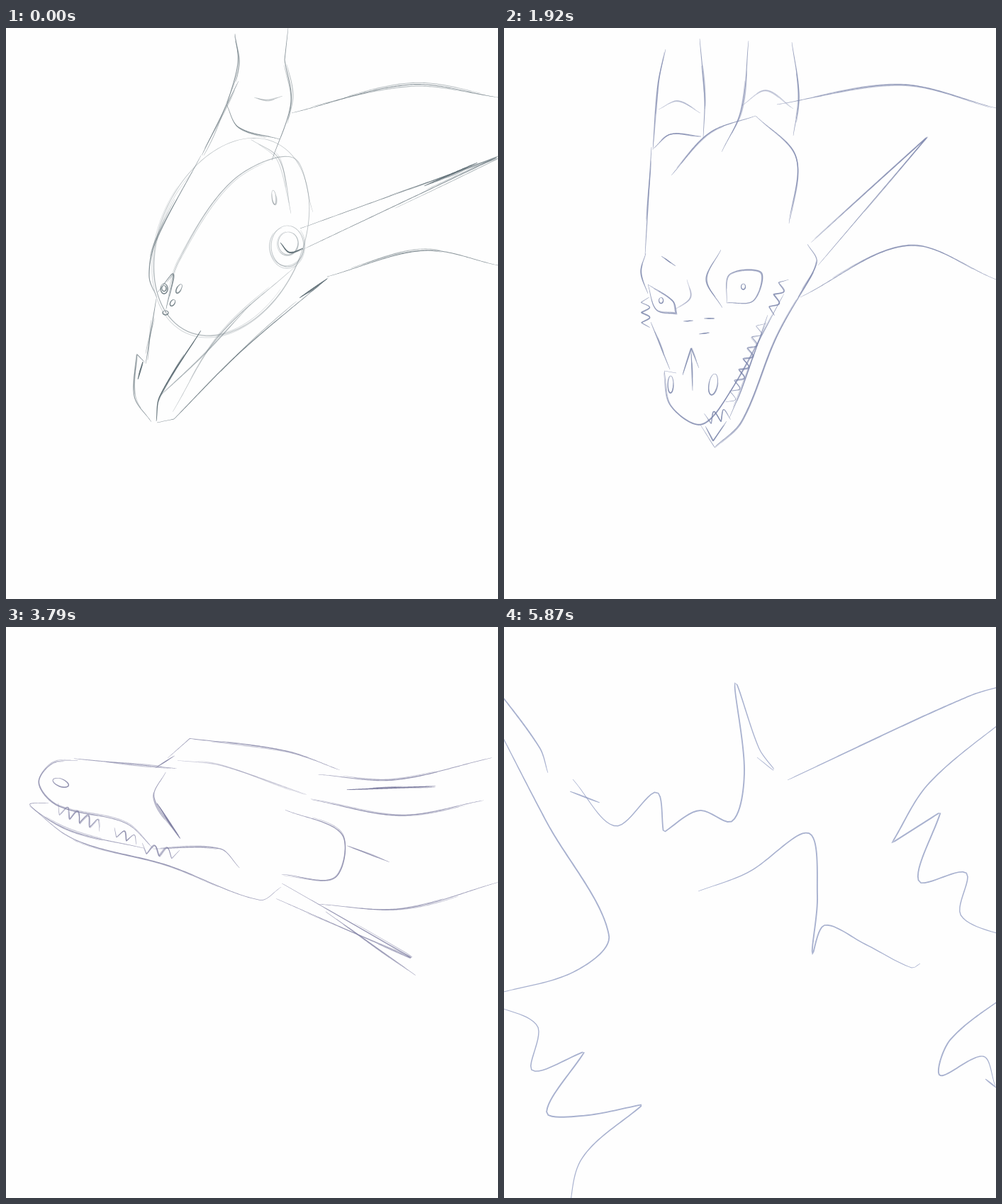
Animation of 694 by 806 pixels, one loop 5970 ms. Source, as an HTML page with a canvas:

```html
<!DOCTYPE html>
<html lang="en">
<meta charset="utf-8">
<title>Dragon head sketch</title>
<style>
html, body { margin: 0; width: 100%; height: 100%; overflow: hidden; background: #fefefe }
canvas { display: block; width: 100vw; height: 100vh }
</style>
<canvas id="stage" width="694" height="806"></canvas>
<script>
const ctx = document.getElementById('stage').getContext('2d');
const N = 120;
const mix = (a, b, p) => a + (b - a) * p;
const mixAll = (a, b, p) => a.map((v, i) => mix(v, b[i], p));
const dist = (a, b) => Math.hypot(b[0] - a[0], b[1] - a[1]);
const random = seed => { const r = Math.sin(seed * 127.1 + 3) * 43758.5; return r - Math.floor(r); };

// Strokes: "x,y x,y" runs through key points, "!" makes one sharp; "o x y rx ry turn" is an oval;
// "z x1 y1 x2 y2 count size" a row of spikes. A leading "*" presses hard, "~" lightly.
// Named lines change into the line of the same name in the next pose; marks belong to one pose.
const poses = [{
  mid: [220, 450], ink: [98, 113, 120], width: 1.1, rough: 2.4,
  lines: {
    hornC: '323,8 327,50 311,110', hornD: '398,0 393,45! 402,105 375,187', ringR: '311,108 328,140 386,157',
    dome: '~o 318 295 100 147 25', skullL: '328,75 276,180', browL: '275,180 212,300 202,350 213,381',
    centre: '~224,404 243,330 320,215 405,183 433,260',
    neckTop: '403,120 570,80 694,98', neckBot: '453,351 590,314 694,335',
    ear: '415,283 694,182! 420,312', earBase: '~o 397 308 23 29',
    jaw: '455,352 330,458 237,552! 213,557', muzzle: '196,472 185,461! 181,520 205,556',
    muzzleL: '212,382 197,474', eyeL: 'o 223 368 5 7', lip: '*212,555 217,520 275,427'
  },
  marks: ['~350,98 370,102 390,96', '~345,157 385,185 402,262', '~o 398 304 14 16', '*387,303 400,317 419,311',
    '~o 378 239 3 10 -8', '~235,542 300,435 410,335', '~218,518 280,460 345,390', '*414,381 453,354',
    '*186,496 193,471', '214,373 236,347 226,396', 'o 244 368 3 7 30', 'o 235 388 3 5 30', 'o 225 402 4 3', '*590,223 665,190']
}, {
  mid: [260, 450], ink: [103, 114, 158], width: 1.2, rough: 2.2,
  lines: {
    hornA: '237,0 228,50 232,95 219,160', hornB: '284,0 287,60 293,140', hornC: '361,15 345,110 314,168',
    crown: '262,178 300,137 360,121', dome: '360,121 417,185 407,278', skullL: '219,156 205,295',
    browL: '*207,292 190,330 222,385 255,403', centre: '~258,390 227,280 268,165',
    neckTop: '375,112 540,92 694,120', neckBot: '440,342 570,309 694,355',
    ear: '430,285 628,143! 440,333', earBase: '~o 421 312 19 31',
    jaw: '440,340 385,440 352,580! 318,633! 290,560', muzzle: '216,485 222,530 268,572! 320,505 350,430 378,400',
    muzzleL: '208,400 228,460 217,484', eyeL: 'o 236 383 17 22', eyeR: 'o 323 368 27 26',
    browR: '298,293 274,340 276,390', lid: '255,402 310,390 382,343',
    nose: '240,488 250,455! 262,486', noseMid: '247,457 251,515', nostrilL: 'o 223 500 7 11', nostrilR: 'o 282 502 5 16 8',
    spikesL: 'z 203 374 203 412 6 7', lip: '~343,440 369,425 367,490 344,592', teeth: 'z 349 450 318 512 9 7'
  },
  marks: ['z 298 540 327 545 4 12', '*290,560 318,633! 350,582', 'o 368 379 9 4', 'o 346 402 8 3', 'o 341 574 4 7',
    'o 328 588 6 7', '~250,200 237,300 257,375', '255,403 310,412 376,372', '~378,345 374,425', '*207,365 222,392 243,404']
}, {
  mid: [270, 450], ink: [122, 132, 170], width: 1.3, rough: 1.2,
  lines: {
    hornA: '228,30 217,80 210,172', hornB: '276,15 283,100 281,155', hornC: '345,18 335,115 307,175', hornD: '406,20 416,95 408,152',
    ringL: '211,170 235,150 278,153', ringR: '~335,110 370,88 408,114', crown: '236,208 290,148 355,124',
    dome: '355,124 412,182 402,276', skullL: '208,168 199,320', browL: '200,318 193,345 203,375',
    neckTop: '385,108 560,80 694,113', neckBot: '418,380 570,307 694,355',
    ear: '433,303 597,154! 443,335', earBase: '428,305 441,330 415,380',
    jaw: '437,345 385,435 335,555 297,592! 277,560', muzzle: '243,487 226,484! 235,533 278,560 318,515 395,375',
    muzzleL: '207,415 234,482', eyeL: '203,362! 238,385 243,403! 215,398 203,362!', eyeR: '314,388 318,348 363,345 352,385 314,388',
    browIn: '~258,355 263,380 242,397', browR: '306,313 286,355 308,395',
    nose: '252,490 264,452! 275,480', noseMid: '264,455 266,512', nostrilL: 'o 235 503 4 12', nostrilR: 'o 295 503 6 15 10',
    spikesL: 'z 199 380 200 423 6 6', spikesR: 'z 396 353 376 404 6 6',
    lip: '372,405 335,510 318,550', teeth: 'z 364 415 318 530 15 6', chin: '284,562 295,583! 314,555'
  },
  marks: ['~218,115 245,103 277,120', 'z 284 552 318 545 5 8', '253,414 267,413', '282,410 297,410', '275,432 290,430', '222,322 242,336']
}, {
  mid: [290, 450], ink: [122, 122, 160], width: 1.15, rough: .9,
  lines: {
    hornA: '211,80 208,150', hornB: '278,78 285,145', hornC: '315,14 331,60 303,162', hornD: '398,22 406,50 402,150',
    ringL: '203,150 245,136 272,147', ringR: '322,112 355,108 403,150', crown: '234,203 262,165 306,130',
    dome: '403,148 396,220 403,273', skullL: '203,150 206,318', browL: '209,318 200,350 250,373 268,393',
    neckTop: '404,96 590,70 694,105', neckBot: '432,350 570,296 694,370',
    ear: '435,287 598,112! 448,322', earBase: '416,287 449,305 430,350',
    jaw: '437,345 385,450 340,560 317,584! 292,548', muzzle: '244,477 253,527 300,548 340,480 390,375',
    muzzleL: '253,450 251,486', eyeL: '213,365! 257,392! 228,388 213,365!', eyeR: '320,387! 345,329 368,350 320,387!',
    browIn: '~225,335 266,362', browR: '301,317 297,370 320,387', lid: '318,389 383,363',
    nose: '266,483 275,443! 290,475', noseMid: '273,445 290,538', nostrilL: 'o 252 495 5 13', nostrilR: 'o 312 493 5 19 12',
    spikesL: 'z 206 376 206 414 6 6', spikesR: 'z 397 345 364 390 6 6',
    lip: '388,385 372,470 318,575', teeth: 'z 370 410 346 500 12 8', chin: '298,549 317,575'
  },
  marks: ['208,400 250,450', '408,306 388,335! 392,352 408,306', '257,405 268,400', '287,437 300,430', 'z 346 500 308 552 9 7']
}, {
  mid: [150, 240], ink: [130, 130, 164], width: 1.2, rough: 1.6,
  lines: {
    muzzle: '95,176 58,178 36,206 62,240 160,270 200,310', chin: '50,235 22,238 80,275 190,301',
    jaw: '386,368 355,386 220,330 90,290 22,240', crown: '228,184 260,156! 400,176 478,205',
    dome: '~235,190 300,196 425,235', browR: '222,200 205,235 240,290', lip: '200,310! 300,304 330,330',
    teeth: 'z 58 249 125 272 9 8', neckTop: '442,213 550,222 685,188', neckBot: '440,393 560,402 694,360',
    earBase: '393,257 475,292 465,355 387,349', ear: '387,365 572,483! 378,386', nostrilR: 'o 67 208 12 5 20'
  },
  marks: ['90,177 235,191', '425,235 550,257 668,236', '475,300 535,323', 'z 145 280 180 293 5 6', 'z 185 303 238 313 6 7',
    '205,190 232,173', '*207,240 240,290', '*475,221 600,216', '445,393 572,483']
}, {
  mid: [280, 470], ink: [113, 113, 154], width: 1.25, rough: 1.4,
  lines: {
    hornA: '249,122 243,204', hornB: '318,128 316,222', hornC: '395,128 362,222', hornD: '460,145 441,248',
    ringL: '236,208 280,188 312,216', ringR: '356,227 395,214 442,248', crown: '~350,180 308,300 303,378',
    skullL: '237,205 223,370', dome: '443,245 411,398', browL: '223,368 255,413 304,437', browR: '317,439 370,420 411,399',
    muzzle: '247,555 285,587 345,505 370,455', muzzleL: '240,435 245,528', nose: '261,543 276,517! 290,548',
    noseMid: '276,520 280,560', nostrilL: 'o 250 549 6 10 -15', nostrilR: 'o 300 560 6 18 35', spikesL: 'z 216 388 222 428 5 7'
  },
  marks: ['*236,396 270,427', '*335,440 382,418', '225,380 225,412 255,435', '403,410 402,440! 350,451', 'z 407 418 407 436 3 4',
    'z 357 451 398 445 5 4', '297,448 279,508', '281,391 290,408', '337,391 325,408', '236,208 271,180']
}, {
  mid: [347, 403], ink: [139, 151, 191], width: 1.9, rough: 0, lines: {},
  marks: ['-20,75 50,170 62,206', '-20,120 60,275 148,435 100,486 -12,518',
    '-20,532 47,563 40,626 114,599! 60,685 110,690 196,674! 110,750 90,835', '93,232 135,248',
    '97,215 157,281 215,233 225,290! 275,259 322,274 339,205 326,78 360,172 382,203 357,184',
    '400,216 655,98 725,78', '725,116 600,220 547,305! 616,261! 585,359 652,347 645,408 725,442',
    '274,373 345,346 430,291 442,380 435,462 452,421 510,448 575,481 587,475', '725,508 630,582 615,633 676,606 693,648', '679,638 694,650']
}];

function oval([x, y, rx, ry, turn = 0]) {
  const c = Math.cos(turn * Math.PI / 180), s = Math.sin(turn * Math.PI / 180);
  return Array.from({ length: N + 1 }, (_, i) => {
    const a = i / N * 6.6 - 2, u = rx * Math.cos(a), v = ry * Math.sin(a);
    return [x + u * c - v * s, y + u * s + v * c];
  });
}

function spikes([x1, y1, x2, y2, n, size]) {
  const d = Math.hypot(x2 - x1, y2 - y1), nx = (y1 - y2) / d * size, ny = (x2 - x1) / d * size;
  return Array.from({ length: n + 1 }, (_, i) => {
    const side = i % 2 ? 1 : -1;
    return { at: [mix(x1, x2, i / n) + nx * side, mix(y1, y2, i / n) + ny * side], sharp: i % 2 };
  });
}

function smooth(knots) {
  const out = [];
  for (let i = 0; i < knots.length - 1; i++) {
    const b = knots[i].at, c = knots[i + 1].at;
    const a = knots[i].sharp || !i ? b : knots[i - 1].at;
    const d = knots[i + 1].sharp || !knots[i + 2] ? c : knots[i + 2].at;
    // Tangents scale with this span so uneven knots do not overshoot
    const span = dist(b, c), ka = span / (dist(a, b) + span), kd = span / (dist(c, d) + span);
    for (let k = 0; k <= 20; k++) {
      const t = k / 20, r = 1 - t;
      out.push([0, 1].map(j => {
        const m = (c[j] - a[j]) * ka, n = (d[j] - b[j]) * kd;
        return b[j] * r * r * (1 + 2 * t) + c[j] * t * t * (3 - 2 * t) + m * t * r * r - n * t * t * r;
      }));
    }
  }
  return out;
}

// Equal steps along a line, so that any two lines can be blended
function resample(line) {
  const at = [0];
  for (let i = 1; i < line.length; i++) at.push(at[i - 1] + dist(line[i - 1], line[i]));
  let k = 1;
  return Array.from({ length: N + 1 }, (_, i) => {
    const want = at.at(-1) * i / N;
    while (k < at.length - 1 && at[k] < want) k++;
    return mixAll(line[k - 1], line[k], (want - at[k - 1]) / (at[k] - at[k - 1] || 1));
  });
}

function trace(text) {
  const press = { '*': 1, '~': .42 }[text[0]] || .75, body = text.replace(/^[*~]/, '');
  const nums = body.slice(1).trim().split(' ').map(Number);
  const knots = () => body.split(' ').map(k => ({ at: k.replace('!', '').split(',').map(Number), sharp: k.endsWith('!') }));
  const line = body[0] === 'o' ? oval(nums) : smooth(body[0] === 'z' ? spikes(nums) : knots());
  return { pts: resample(line), press };
}

for (const pose of poses) {
  for (const k in pose.lines) pose.lines[k] = trace(pose.lines[k]);
  pose.marks = pose.marks.map(trace);
}

// Pencil line that thins out at both ends
function ribbon(pts, width) {
  const left = [], right = [], last = pts.length - 1;
  pts.forEach(([x, y], i) => {
    const a = pts[Math.max(0, i - 1)], b = pts[Math.min(last, i + 1)], d = dist(a, b) || 1;
    const w = width / 2 * (.25 + .75 * Math.sqrt(Math.abs(Math.sin(Math.PI * i / last))));
    const nx = (a[1] - b[1]) / d * w, ny = (b[0] - a[0]) / d * w;
    left.push([x + nx, y + ny]);
    right.unshift([x - nx, y - ny]);
  });
  ctx.beginPath();
  for (const p of left.concat(right)) ctx.lineTo(p[0], p[1]);
  ctx.fill();
}

// One firm line, then loose partial strokes beside it
function pencil(pts, press, width, rough, seed) {
  ctx.globalAlpha = press;
  ribbon(pts, press === 1 ? width * 1.6 : width);
  const amp = rough * Math.min(1, dist(pts[0], pts[N >> 1]) / 50);
  for (let k = 1; k <= 2 && amp; k++) {
    const r = n => random(seed * 9 + k * 3 + n), from = Math.floor(r(0) * 45), to = N - Math.floor(r(1) * 45);
    ctx.globalAlpha = press * .6;
    ribbon(pts.slice(from, to).map(([x, y], i) =>
      [x + amp * Math.sin(r(2) * 6 + i / 30), y + amp * Math.cos(r(3) * 6 + i / 30)]), width);
  }
}

function drawPose(A, B, p) {
  const near = p < .5 ? A : B, mid = mixAll(A.mid, B.mid, p), [dx, dy] = mid.map((v, i) => v - near.mid[i]);
  const width = mix(A.width, B.width, p), rough = mix(A.rough, B.rough, p);
  let seed = 0;
  const put = (pts, press) => pencil(pts, press, width, rough, ++seed);
  const shift = s => put(s.pts.map(([x, y]) => [x + dx, y + dy]), s.press);
  ctx.fillStyle = `rgb(${mixAll(A.ink, B.ink, p).map(Math.round)})`;
  for (const k in near.lines) {
    const a = A.lines[k], b = B.lines[k];
    if (!a || !b) { shift(near.lines[k]); continue; }
    const pts = a.pts.map((q, i) => mixAll(q, b.pts[i], p));
    put(pts, near.lines[k].press);
    if (k.startsWith('eye')) {
      const [x, y] = [0, 1].map(j => pts.reduce((sum, q) => sum + q[j], 0) / pts.length);
      put(oval([x, y, 3, 4]), .75);
    }
  }
  near.marks.forEach(shift);
}

// Each beat: start, pose, held drawings until the next beat, part of the beat in which the pose changes
const beats = [[0, 0, 8, 0, 1], [960, 1, 8, 0, 1], [1920, 2, 12, 0, 1], [3290, 3, 10, 0, .57],
  [4260, 4, 10, .2, 1], [5190, 5, 8, 1, 2], [5870, 6, 1, 1, 2], [5970, 6]];

function draw(i, u) {
  const [, pose, , from, to] = beats[i], v = Math.min(1, Math.max(0, (u - from) / (to - from)));
  ctx.globalAlpha = 1;
  ctx.fillStyle = '#fefefe';
  ctx.fillRect(0, 0, 694, 806);
  ctx.save();
  if (pose === 5) { // lunge at the viewer
    ctx.translate(330, 245);
    ctx.scale(1 + .7 * u * u, 1 + .7 * u * u);
    ctx.translate(-330, -245);
  }
  drawPose(poses[pose], poses[beats[i + 1][1]], v * v * (3 - 2 * v));
  ctx.restore();
}

let start, shown;
function tick(now) {
  start ??= now;
  const t = (now - start) % 5970, i = beats.findIndex(b => t < b[0]) - 1;
  const [at, , steps] = beats[i], step = Math.floor((t - at) / (beats[i + 1][0] - at) * steps);
  if (shown !== i + step / 100) draw(i, step / steps);
  shown = i + step / 100;
  requestAnimationFrame(tick);
}
draw(0, 0);
requestAnimationFrame(tick);
</script>
</html>
```
